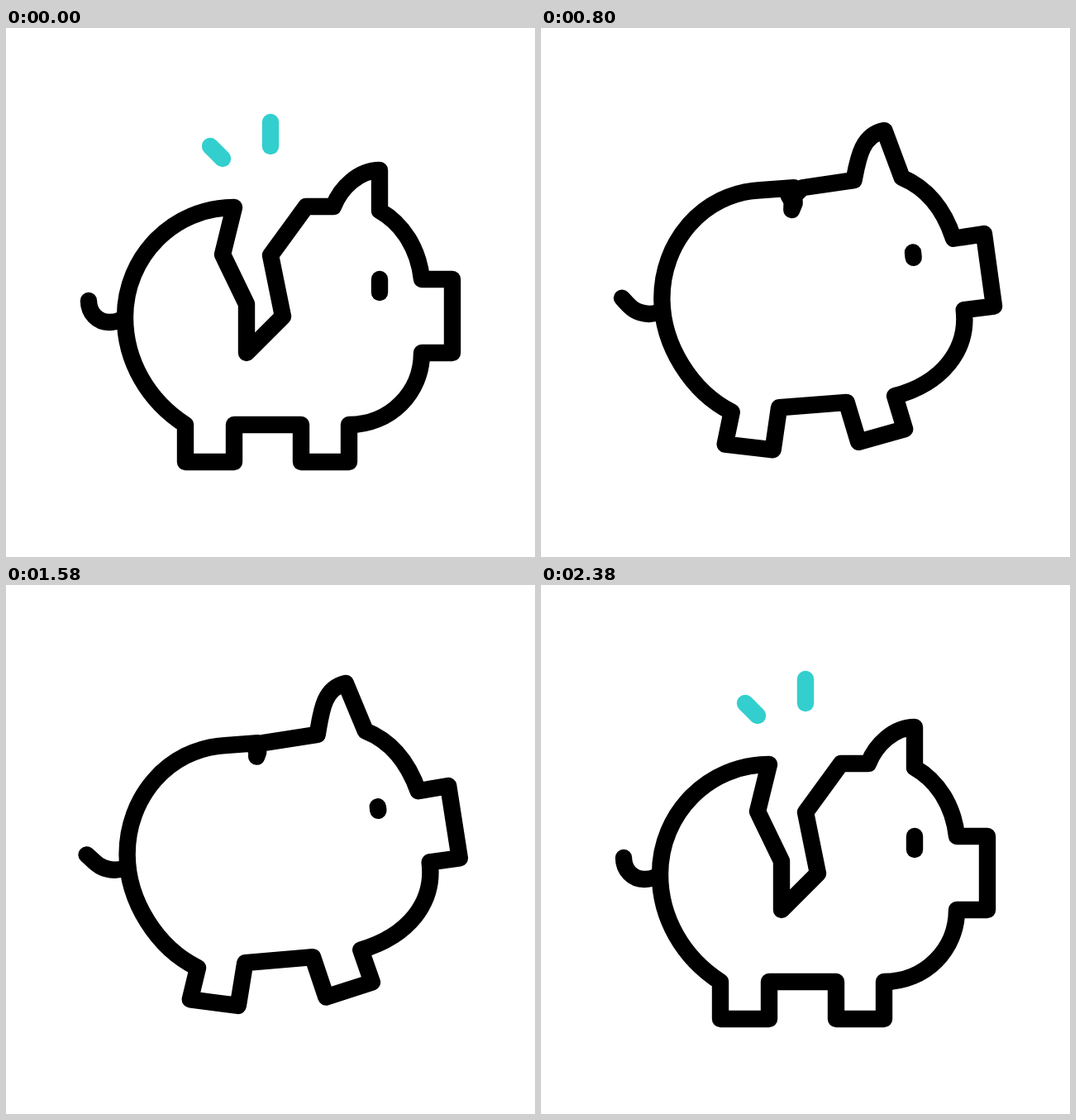
An HTML page without scripts that plays this animation: 640 px wide and 640 px high, repeating every 2.4 s.

```html
<!DOCTYPE html>
<html lang="en">
<head>
<meta charset="utf-8">
<title>Piggy bank</title>
<style>
html, body { margin: 0; width: 100%; height: 100%; overflow: hidden; background: #fff; }
svg { display: block; width: 100%; height: 100%; }
path { fill: none; stroke: #000; stroke-width: 20.4; stroke-linecap: round; stroke-linejoin: round; }

.pig { d: var(--broken); animation: mend 2400ms infinite; }

.body {
  --broken: path("M276 217 L262 274 L291 334 L291 393 L335 349 L320 275 L363 216 L396 216 C405 193 427 172 452 172 L452 221 C480 237 499 267 503 304 L540 304 L540 393 L503 393 C503 441 465 480 415 480 L415 525 L357 525 L357 480 L276 480 L276 525 L217 525 L217 480 C172 451 144 403 144 350 C144 276 203 217 276 217 Z");
  --half: path("M312 204 L292 231 L305 255 L304 284 L314 261 L313 234 L343 204 L388 201 C395 181 408 153 439 151 L446 203 C475 218 495 246 501 283 L540 280 L544 369 L507 370 C510 420 472 460 422 464 L426 508 L368 513 L363 467 L282 470 L280 517 L222 515 L224 472 C178 444 147 392 145 340 C143 268 195 210 265 207 Z");
  --whole: path("M303 188 L303 188 L303 188 L303 189 L303 188 L303 188 L303 188 L374 176 C378 147 378 118 404 111 L432 170 C462 181 484 206 498 241 L534 234 L550 321 L514 327 C521 376 490 416 431 436 L447 474 L392 495 L373 446 L291 454 L281 507 L223 498 L234 461 C184 438 147 380 147 323 C147 255 196 195 265 191 Z");
}
.tail {
  --broken: path("M100 330 C100 345 111 356 125 356 C130 356 135 355 139 353");
  --half: path("M100 328 C102 342 113 352 126 352 C131 352 136 351 140 349");
  --whole: path("M97 326 C108 332 112 342 133 343 C137 343 141 342 144 341");
}
.eye {
  --broken: path("M452 304 L452 320");
  --half: path("M451 288 L452 303");
  --whole: path("M449.5 263.5 L450 265.5");
}

.spark { stroke: #32cfce; stroke-dasharray: 1 2; animation: spark 2400ms infinite; }

@keyframes mend {
  0%, 19.167%, 80%, 100% { d: var(--broken); animation-timing-function: cubic-bezier(.42, 0, .67, .37); }
  27.5% { d: var(--half); animation-timing-function: cubic-bezier(.25, .65, .3, 1); }
  48.333%, 54.583% { d: var(--whole); animation-timing-function: cubic-bezier(.7, 0, .75, .35); }
  72.917% { d: var(--half); animation-timing-function: cubic-bezier(.33, .63, .58, 1); }
}
@keyframes spark {
  0% { stroke-dashoffset: 0; visibility: visible; animation-timing-function: cubic-bezier(.33, 0, .67, 1); }
  7.4% { stroke-dashoffset: 1; visibility: visible; }
  7.5%, 79.9% { stroke-dashoffset: 1; visibility: hidden; }
  80% { stroke-dashoffset: 1; visibility: visible; animation-timing-function: cubic-bezier(.3, .1, .3, 1); }
  100% { stroke-dashoffset: 0; visibility: visible; }
}
</style>
</head>
<body>
<svg viewBox="0 0 640 640">
  <path class="pig tail"/>
  <path class="pig body"/>
  <path class="pig eye"/>
  <path class="spark" pathLength="1" d="M262 158 L247 143"/>
  <path class="spark" pathLength="1" d="M320 143 L320 114"/>
</svg>
</body>
</html>
```
